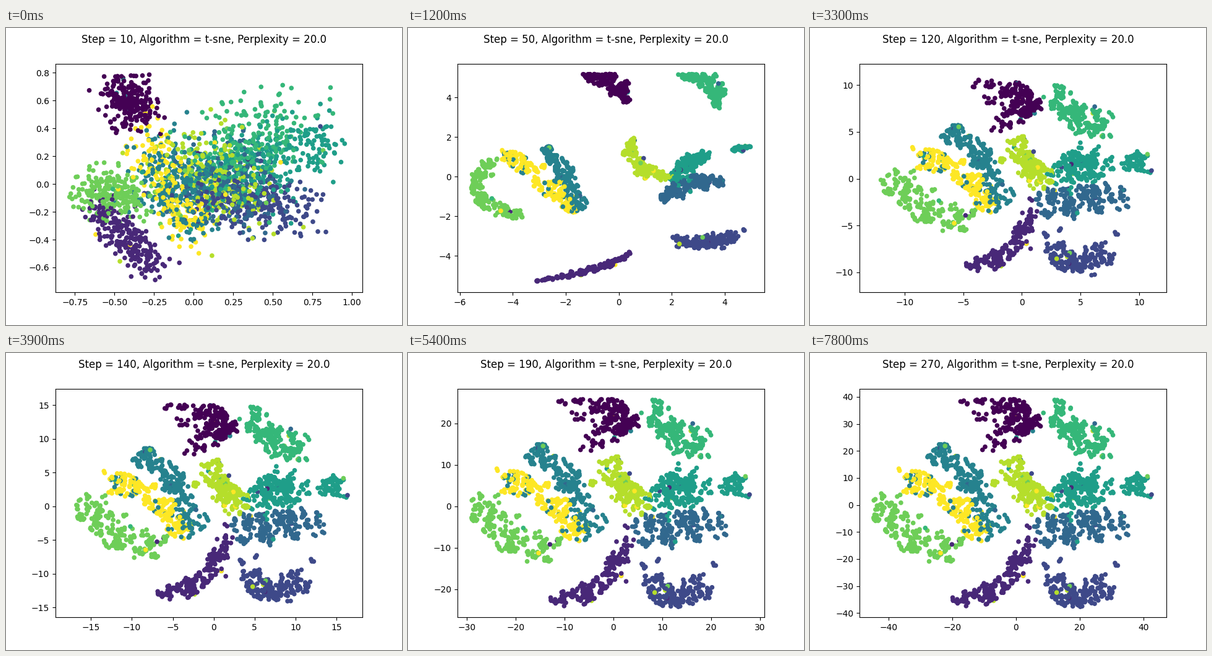
Write a matplotlib script that moves like this. It is 640 by 480 pixels and loops after 8000 ms.

```python
import numpy as np
import matplotlib.pyplot as plt
from matplotlib.animation import FuncAnimation

rng = np.random.default_rng(20)

# Plot area and the range the points fill, in stage pixels (y down)
LEFT, TOP, WIDTH, HEIGHT = 80, 57.6, 496, 369.6
LOW, HIGH = np.array([102.5, 74.4]), np.array([553.5, 410.4])

LIMIT_STEPS = [10, 50, 90, 100, 120, 160, 230, 270]
LIMITS = np.array([  # left, right, bottom, top
    (-0.873, 1.067, -0.779, 0.866),
    (-6.09, 5.50, -5.85, 5.70),
    (-7.375, 5.995, -6.97, 6.64),
    (-7.70, 6.20, -7.25, 6.90),
    (-13.85, 12.32, -12.13, 12.29),
    (-24.83, 24.04, -20.80, 22.60),
    (-41.40, 40.15, -34.80, 36.10),
    (-49.10, 47.20, -41.60, 43.05),
])
POSE_STEPS = [10, 50, 90, 100, 120, 180]

# One row per cluster: Bezier control points, then radius
DIGITS = [*range(10), 5]
START = [
    (186, 100, 220, 140, 33),
    (240, 392, 140, 285, 24),
    (300, 270, 505, 300, 38),
    (330, 245, 400, 260, 60),
    (250, 240, 320, 265, 58),
    (345, 250, 440, 205, 55),
    (455, 150, 330, 230, 58),
    (132, 260, 215, 275, 33),
    (295, 205, 380, 285, 55),
    (225, 180, 305, 325, 36),
    (490, 165, 522, 215, 32),
]
EARLY = [
    (288, 77, 345, 80, 352, 115, 15),
    (203, 410, 330, 388, 358, 364, 4),
    (428, 338, 480, 358, 545, 328, 9),
    (412, 275, 455, 245, 508, 250, 13),
    (222, 195, 255, 235, 280, 293, 14),
    (430, 245, 438, 220, 485, 205, 14),
    (443, 74, 505, 82, 500, 125, 15),
    (140, 210, 62, 275, 192, 306, 13),
    (362, 180, 350, 235, 425, 240, 11),
    (150, 205, 215, 225, 270, 298, 18),
    (522, 198, 535, 194, 555, 190, 3),
]
LATE = [
    (258, 85, 430, 95, 285, 140, 19),
    (240, 400, 335, 390, 350, 297, 14),
    (393, 340, 400, 440, 505, 352, 17),
    (385, 285, 430, 285, 500, 278, 25),
    (205, 163, 270, 190, 298, 292, 17),
    (412, 238, 415, 195, 478, 220, 25),
    (403, 92, 420, 150, 480, 145, 22),
    (115, 240, 130, 305, 245, 318, 24),
    (325, 180, 335, 215, 375, 248, 19),
    (148, 210, 225, 200, 275, 297, 18),
    (518, 217, 525, 206, 542, 212, 15),
]


def bezier(row, t):
    points = [np.array(row[i:i + 2]) for i in range(0, len(row) - 1, 2)]
    while len(points) > 1:
        points = [a + (b - a) * t for a, b in zip(points, points[1:])]
    return points[0]


def inside(points):
    """Reflect strays back into the range of the data."""
    return HIGH - np.abs(HIGH - LOW - np.abs(points - LOW))


def drift(points):
    """Middle of the top and bottom edges slides to the right."""
    x, y = points.T
    dx = 38 * ((y - 240) / 145) ** 2 * np.exp(-((x - 310) / 150) ** 2)
    return np.column_stack([x + dx, y])


def squeeze(points):
    """Flatter layout with the left half nearer to the centre."""
    x, y = points.T
    return np.column_stack([x + 22 * np.clip((380 - x) / 150, 0, 1),
                            245 + 0.9 * (y - 245)])


def cluster(count, start, early, late):
    """Positions of one cluster at every pose step."""
    clumps = count * 2 // 5
    t = rng.uniform(0, 1, clumps)
    angle = rng.uniform(0, 2 * np.pi, clumps)
    reach = 1.1 * np.sqrt(rng.uniform(0, 1, clumps))
    reach[rng.random(clumps) < 0.05] *= 1.9
    disk = np.column_stack([np.cos(angle), np.sin(angle)]) * reach[:, None]

    member = rng.integers(0, clumps, count)
    t, disk = t[member, None], disk[member]
    jitter = rng.normal(0, 1, (count, 2))

    first = bezier(start, t) + 0.58 * start[-1] * rng.normal(0, 1, (count, 2))
    r = early[-1] * (0.35 + 0.65 * np.sin(np.pi * t))
    tight = bezier(early, t) + r * disk + jitter * np.minimum(1.8, 0.3 * r)
    spread = bezier(late, t) + late[-1] * disk + jitter * 2.6
    settled = drift(tight)
    return [inside(p) for p in
            (first, tight, settled, settled, squeeze(spread), spread)]


counts = [240] * 10 + [65]
digits = np.repeat(DIGITS, counts)
poses = np.concatenate(
    [cluster(*row) for row in zip(counts, START, EARLY, LATE)], axis=1)

# A few digits sit in the wrong cluster, most often 4 among 9
odd = rng.random(len(digits)) < 0.03
mixed = (digits == 9) & (rng.random(len(digits)) < 0.13)
digits[odd] = rng.integers(1, 10, odd.sum())
digits[mixed] = 4
order = rng.permutation(len(digits))
digits, poses = digits[order], poses[:, order]


def blend(steps, values, step):
    i = min(max(np.searchsorted(steps, step) - 1, 0), len(steps) - 2)
    f = np.clip((step - steps[i]) / (steps[i + 1] - steps[i]), 0, 1)
    if i == 0:
        f = np.sin(f * np.pi / 2)
    return values[i] + f * (values[i + 1] - values[i])


fig, ax = plt.subplots(figsize=(6.4, 4.8), dpi=100)
dots = ax.scatter(np.zeros(len(digits)), np.zeros(len(digits)), s=20, c=digits,
                  cmap="viridis", vmin=0, vmax=9)
title = fig.suptitle("")


def draw(frame):
    step = 10 * (frame // 3 + 1)
    left, right, bottom, top = blend(LIMIT_STEPS, LIMITS, step)
    x, y = blend(POSE_STEPS, poses, step).T
    dots.set_offsets(np.column_stack([
        left + (x - LEFT) / WIDTH * (right - left),
        top - (y - TOP) / HEIGHT * (top - bottom),
    ]))
    ax.set(xlim=(left, right), ylim=(bottom, top))
    title.set_text(f"Step = {step}, Algorithm = t-sne, Perplexity = 20.0")
    return dots, title


anim = FuncAnimation(fig, draw, frames=80, interval=100, repeat=True, repeat_delay=0)
plt.show()
```
